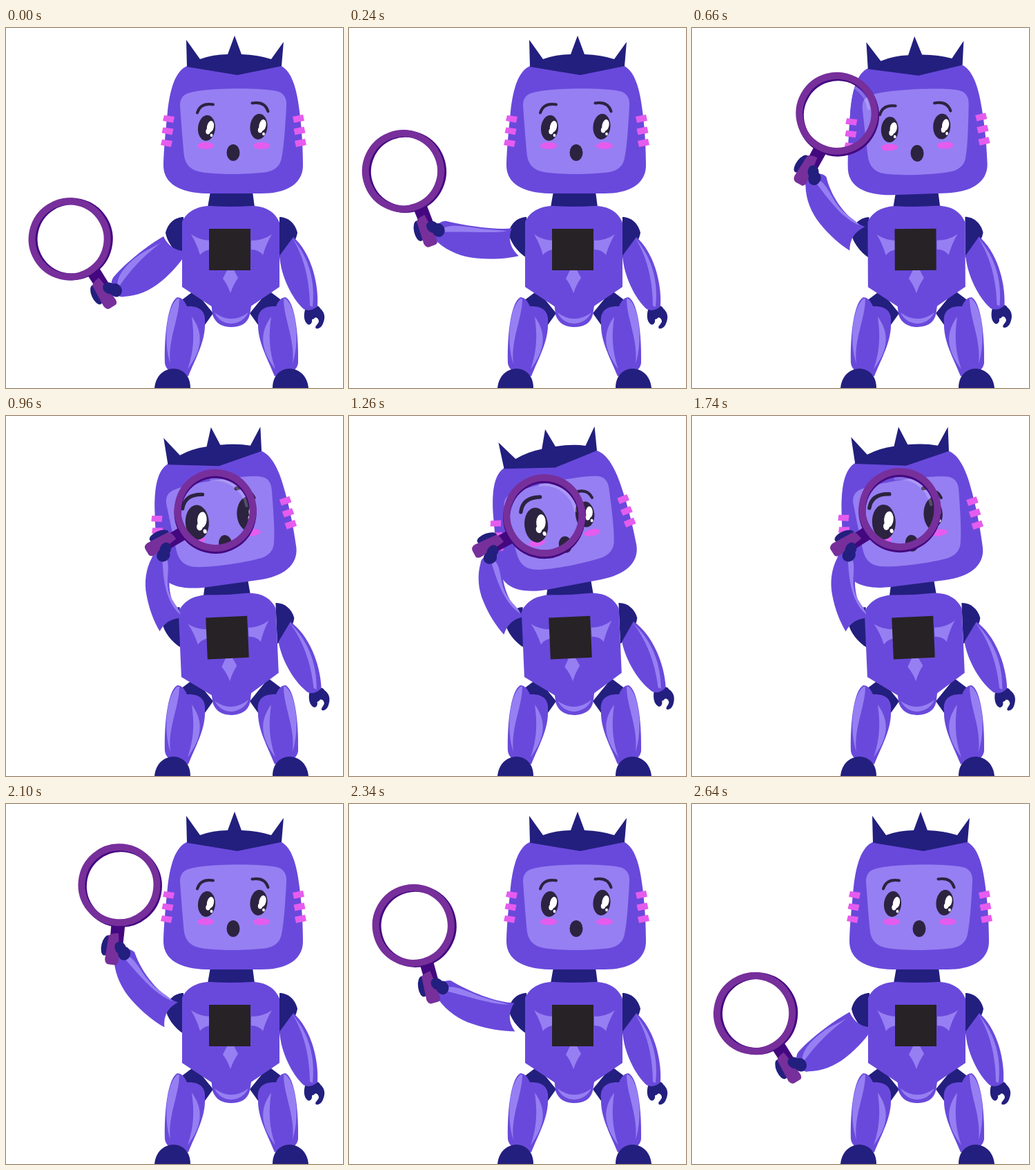
These frames come from a looping animation (488x520 px, 2.67 s). An HTML page with a canvas:

```html
<!DOCTYPE html>
<html lang="en">
<head>
<meta charset="utf-8">
<title>Robot with magnifier</title>
<style>
  html, body { margin: 0; width: 488px; height: 520px; overflow: hidden; background: #fff; }
  canvas { display: block; }
</style>
</head>
<body>
<canvas id="stage" width="488" height="520"></canvas>
<script>
const ctx = document.getElementById('stage').getContext('2d');
const LOOP = 2670;
const BODY = '#6949db', LIGHT = '#967ff2', NAVY = '#231f7e', PINK = '#e55cee',
      INK = '#2c2340', RING = '#772f9b', RING_DARK = '#43087f', BADGE = '#272225';

const SHOULDER = [246, 305];
const GRIP = [91, -12.6]; // palm, seen from the lens centre along the handle

// Key points of the raised arm: time, arm direction, reach, handle direction
const KEYS = [
  [0, 143, 117, 58],
  [240, 188, 123, 69],
  [570, 231, 123, 96],
  [660, 234, 117, 119],
  [930, 262, 111, 148],
  [1335, 249, 113, 152]
];

// Smooth curve through the key points, at rest at both ends.
function armAt(t) {
  const last = KEYS.length - 1;
  let i = 0;
  while (i < last - 1 && t > KEYS[i + 1][0]) i++;
  const from = KEYS[i], to = KEYS[i + 1];
  const span = to[0] - from[0], s = (t - from[0]) / span;
  const slope = (k, n) => k === 0 || k === last ? 0
    : (KEYS[k + 1][n] - KEYS[k - 1][n]) / (KEYS[k + 1][0] - KEYS[k - 1][0]);
  return [1, 2, 3].map(n => from[n] + (to[n] - from[n]) * s * s * (3 - 2 * s)
    + span * s * (s - 1) * (slope(i, n) * (s - 1) + slope(i + 1, n) * s));
}

const rad = deg => deg * Math.PI / 180;
const progress = (t, start, end) => Math.max(0, Math.min(1, (t - start) / (end - start)));
const easeInOut = s => s * s * (3 - 2 * s);
const easeOut = s => Math.sin(s * Math.PI / 2);

function shape(path, color) {
  ctx.fillStyle = color;
  ctx.fill(new Path2D(path));
}

function oval(x, y, rx, ry, color, tilt = 0) {
  ctx.fillStyle = color;
  ctx.beginPath();
  ctx.ellipse(x, y, rx, ry, rad(tilt), 0, 2 * Math.PI);
  ctx.fill();
}

function arc(x, y, r, color, width, start = 0, end = 360) {
  ctx.beginPath();
  ctx.arc(x, y, r, rad(start), rad(end));
  ctx.strokeStyle = color;
  ctx.lineWidth = width;
  ctx.stroke();
}

function group(draw) {
  ctx.save();
  draw();
  ctx.restore();
}

function turn(deg, x, y) {
  ctx.translate(x, y);
  ctx.rotate(rad(deg));
  ctx.translate(-x, -y);
}

function bothSides(draw) {
  draw();
  group(() => {
    ctx.translate(653, 0);
    ctx.scale(-1, 1);
    draw();
  });
}

function leg() {
  shape('M253 394L273 379L300 412L285 433Z', NAVY);
  shape('M248 389C235 396 229 440 230 484C231 492 237 496 243 498L264 503C275 476 289 452 288 426C290 409 280 401 262 402C258 393 254 389 248 389Z', BODY);
  shape('M248 391C231 406 228 455 238 485C234 450 251 420 251 391Z', LIGHT);
  shape('M269 417C286 440 285 464 263 493C272 466 273 445 269 417Z', LIGHT);
  shape('M215 520C217 500 231 492 243 492C258 493 267 504 267 520Z', NAVY);
}

function rightArm(swing) {
  turn(swing, 400, 298);
  shape('M433 407C441 400 453 399 455 405C463 412 462 420 459 427C457 432 453 435 449 434C446 431 452 428 453 424C453 419 448 416 446 420L443 421C444 426 440 430 437 428C431 424 431 414 433 407Z', NAVY);
  shape('M416 302C440 323 453 365 451 402C444 408 438 409 431 406C414 391 398 358 396 329Z', BODY);
  shape('M415 304C440 333 448 368 444 403L440 401C440 364 431 330 415 304Z', LIGHT);
}

function torso(angle, swing) {
  turn(angle, 325, 400);
  shape('M296 236H357L360 259H292Z', NAVY);
  bothSides(() => shape('M257 273C245 273 234 282 231 296C233 308 243 323 257 332Z', NAVY));
  group(() => rightArm(swing));
  shape('M297 396L299 414C303 427 314 432 326 432C339 432 350 427 353 414L356 396Z', BODY);
  shape('M255 280C262 264 279 257 296 257Q326 259 356 257C376 257 390 266 396 281V374L350 405Q325 419 302 405L255 374Z', BODY);
  shape('M302 411Q326 429 351 411Q343 426 326 427Q309 426 302 411Z', LIGHT);
  bothSides(() => shape('M268 298Q281 307 298 307V320Q287 320 281 328Q276 311 268 298Z', LIGHT));
  shape('M325 340L336 361Q329 371 325 383Q321 371 314 362Z', LIGHT);
  ctx.fillStyle = BADGE;
  ctx.fillRect(294, 290, 60, 60);
}

function eye(x, y, side, zoom) {
  ctx.translate(x + (zoom - 1) * 6, y);
  ctx.scale(zoom, zoom);
  oval(0, 0, 12.5, 18.5, INK, 5);
  oval(5.5, -2, 5, 8.5, '#fff', 12);
  oval(2, 5, 3.2, 4, '#fff');
  oval(7, 10.5, 1.9, 2.3, '#fff');
  ctx.translate(0, (zoom - 1) * 15);
  ctx.scale(side, 1);
  ctx.strokeStyle = INK;
  ctx.lineWidth = 4;
  ctx.lineCap = 'round';
  ctx.stroke(new Path2D('M-13.5 -22Q-9 -37 9.5 -34'));
}

function head(tilt, zoom) {
  ctx.translate(-3 * tilt, 5 * tilt);
  turn(-10.8 * tilt, 327, 248);
  shape('M262 55H399C413 63 421 85 425 120C429 150 430 180 430 200C429 226 405 239 370 239H290C252 238 229 225 228 200C228 180 231 150 234 120C238 85 246 62 262 55Z', BODY);
  shape('M262 56L261 17L281 45Q300 38 321 38L331 11L341 38Q366 39 384 45L402 20L399 55L335 68Z', NAVY);
  shape('M268 93C295 86 370 86 391 91C402 93 407 101 406 113C404 150 402 175 399 188C397 200 388 206 378 208C350 212 305 212 282 208C266 205 260 196 258 185C255 155 253 125 252 112C252 100 258 95 268 93Z', LIGHT);
  for (let i = 0; i < 3; i++) {
    shape(`M${229 - i * 1.5} ${126 + i * 17.5}l15 2l-2 9l-15 -3Z`, PINK);
    shape(`M${415 + i * 1.5} ${128 + i * 17.5}l15 -3l2 9l-15 3Z`, PINK);
  }
  oval(289, 170, 12, 5, PINK);
  oval(370, 170, 12, 5, PINK);
  oval(329, 180, 9.5, 12, INK);
  group(() => eye(290.5, 144.5, 1, zoom));
  group(() => eye(366, 142.5, -1, zoom));
}

// Drawn along the x axis from shoulder to wrist; the inner edge sinks as the arm rises.
function raisedArm(direction, reach) {
  const inner = 17 - 21 * (direction - 143) / 107;
  const shine = inner * .75 + 1;
  ctx.translate(...SHOULDER);
  ctx.rotate(rad(direction));
  ctx.scale(reach / 118, 1);
  shape(`M12 14C35 ${inner} 75 ${inner} 104 11C112 10 118 2 118 -7C118 -14 116 -19 111 -21C95 -32 75 -37 55 -36C32 -35 12 -30 -3 -24Q17 -10 12 14Z`, BODY);
  shape(`M110 -6C106 8 82 ${shine} 62 ${shine}S30 9 18 9C40 ${shine - 5} 70 ${shine - 6} 110 -6Z`, LIGHT);
}

function magnifier(x, y, angle) {
  ctx.translate(x, y);
  arc(0, 0, 46, 'rgba(255,255,255,.2)', 4, -100, -8);
  ctx.rotate(rad(angle));
  oval(88, 11, 15, 7, NAVY, 8);
  shape('M54 -13L98 -13V6L54 7Z', RING_DARK);
  arc(.8, -1.3, 54.5, RING_DARK, 10);
  arc(-.8, 1.3, 54.5, RING, 10);
  shape('M69 -5Q70 7 74 9L108 11Q115 10 115 5V-5Q114 -9 108 -9L84 -7Z', RING);
  oval(90, -10, 10, 8, NAVY, -35);
  oval(97, -16, 10, 9, NAVY);
}

function render(time) {
  const t = time % LOOP;
  const p = Math.min(t, LOOP - t); // forward, then back the same way
  const tilt = easeOut(progress(p, 570, 1335));
  const lean = easeInOut(progress(p, 600, 900));
  const [direction, reach, handle] = armAt(p);

  const a = rad(direction), h = rad(handle);
  const lensX = SHOULDER[0] + reach * Math.cos(a) - GRIP[0] * Math.cos(h) + GRIP[1] * Math.sin(h);
  const lensY = SHOULDER[1] + reach * Math.sin(a) - GRIP[0] * Math.sin(h) - GRIP[1] * Math.cos(h);

  ctx.clearRect(0, 0, 488, 520);
  bothSides(leg);
  group(() => torso(-2.5 * lean, -4.5 * tilt));
  group(() => head(tilt, 1));
  group(() => {
    ctx.beginPath();
    ctx.arc(lensX, lensY, 50, 0, 2 * Math.PI);
    ctx.clip();
    head(tilt, 1.36);
  });
  group(() => raisedArm(direction, reach));
  group(() => magnifier(lensX, lensY, handle));
}

function tick() {
  render(performance.now());
  requestAnimationFrame(tick);
}
tick();
</script>
</body>
</html>
```
